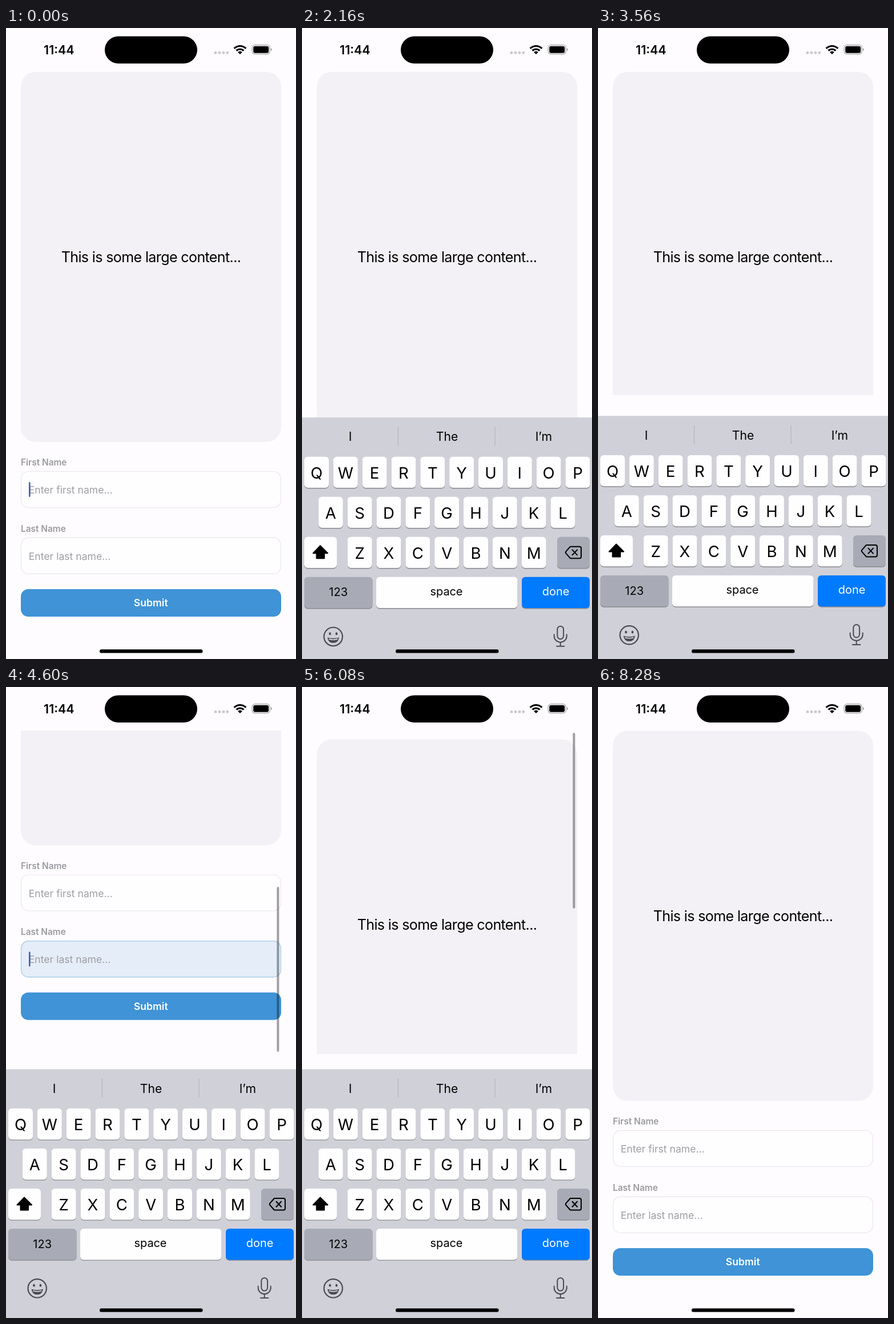
An HTML page for the animation above (8.32 s loop, 508 px wide and 1102 px high).

```html
<!DOCTYPE html>
<html lang="en">
<head>
<meta charset="utf-8">
<title>Form with keyboard</title>
<style>
  html, body { margin: 0; width: 100%; height: 100%; overflow: hidden; background: #fefcff; }
  svg { display: block; width: 508px; height: 1102px; }
  text { font-family: Inter, Roboto, sans-serif; font-optical-sizing: none; }
</style>
</head>
<body>
<svg id="stage" viewBox="0 0 508 1102" xmlns="http://www.w3.org/2000/svg"></svg>
<script>
const LOOP = 8320;
const VIEW_TOP = 76, VIEW_BOTTOM = 641;
const MAX_SCROLL = 412.5;
const KEYBOARD_H = 434.5;

// ---------- drawing helpers ----------
const rect = (x, y, w, h, r, fill, extra = '') =>
  `<rect x="${x}" y="${y}" width="${w}" height="${h}" rx="${r}" fill="${fill}" ${extra}/>`;

const text = (x, y, size, str, { fill = '#000', weight = 400, anchor = 'middle', track = 0 } = {}) =>
  `<text x="${x}" y="${y}" font-size="${size}" font-weight="${weight}" fill="${fill}" ` +
  `text-anchor="${anchor}" letter-spacing="${track}em">${str}</text>`;

const line = (d, width, color, extra = '') =>
  `<path d="${d}" fill="none" stroke="${color}" stroke-width="${width}" ` +
  `stroke-linecap="round" stroke-linejoin="round" ${extra}/>`;

function field(id, y, label, hint) {
  const box = (fill, stroke, extra) =>
    rect(26.5, y + .5, 455, 63, 13, fill, `stroke="${stroke}" stroke-width="1.2" ${extra}`);
  return text(26, y - 9.8, 15.4, label, { fill: '#9b9a9f', weight: 600, anchor: 'start' }) +
    box('#fefdff', '#e9e7ec', '') +
    box('#e4edf8', '#a5cbeb', `id="${id}Glow" opacity="0"`) +
    text(39.8, y + 39, 17.6, hint, { fill: '#9f9ea3', anchor: 'start' }) +
    rect(40, y + 19, 2.6, 26, 1.3, '#4560b0', `id="${id}Caret" opacity="0"`);
}

function form() {
  return rect(26, 76.5, 456, 646.5, 26, '#f3f1f5') +
    text(254, 409, 25.1, 'This is some large content...', { track: -.026 }) +
    field('first', 774, 'First Name', 'Enter first name...') +
    field('last', 889.7, 'Last Name', 'Enter last name...') +
    rect(26, 980, 456, 48, 13, '#3f93d6') +
    text(253.7, 1010.3, 17.6, 'Submit', { fill: '#fff', weight: 600 });
}

const key = (x, y, w, fill = '#fefdff') =>
  rect(x, y + 1.4, w, 54.4, 6, '#898a8e') + rect(x, y, w, 54.4, 6, fill);

const keyRow = (letters, x, y) => [...letters].map((c, i) => {
  const left = x + i * 50.83;
  return key(left, y, 43) + text(left + 21.5, y + 38, 27.6, c);
}).join('');

function keyboard() {
  const ink = '#4b4c51', grey = '#a8abb5';
  const words = ['I', 'The', 'I’m'].map((w, i) => text(84.7 + i * 169.3, 708.6, 21.2, w)).join('');
  const dividers = [168.5, 338].map(x => rect(x - .6, 684, 1.2, 33, 0, '#b5b6bd')).join('');
  const shift = `<path d="M32 891.5L45 904.5H39V913.5H25.500V904.500H19.500Z" stroke="#000" ` +
    `stroke-width="2" stroke-linejoin="round"/>`;
  const erase = line('M470 893H486Q489 893 489 896V910.500Q489 913.500 486 913.500H470' +
      'L462.500 905Q461 903.200 462.500 901.500Z', 2, '#000') +
    line('M473.500 898.700L482 907.700M482 898.700L473.500 907.700', 2, '#000');
  const smiley = `<circle cx="54.700" cy="1050.300" r="16.200" fill="none" stroke="${ink}" stroke-width="2.200"/>` +
    [49, 60.4].map(x => `<ellipse cx="${x}" cy="1045" rx="1.900" ry="2.500" fill="${ink}"/>`).join('') +
    `<path d="M44.500 1051.500Q54.700 1054.500 65 1051.500Q63.500 1061.300 54.700 1061.300Q46 1061.300 44.500 1051.500Z" fill="${ink}"/>` +
    line('M47.800 1054.600Q54.700 1056.800 61.700 1054.600', 1.9, '#d0d1d8');
  const mic = rect(447.3, 1032, 10.8, 22.5, 5.4, 'none', `stroke="${ink}" stroke-width="2"`) +
    line('M441.700 1046.500V1049.500A11 10.500 0 0 0 463.700 1049.500V1046.500M452.700 1060V1067M446 1067H459.400', 2, ink);
  return rect(0, 667.5, 508, 436, 0, '#d0d1d8') + words + dividers +
    keyRow('QWERTYUIOP', 4, 736) +
    keyRow('ASDFGHJKL', 28.8, 806) +
    keyRow('ZXCVBNM', 79.7, 876) +
    key(4, 876, 57) + shift + key(447, 876, 57, grey) + erase +
    key(4, 946, 119.5, grey) + text(63.7, 979.6, 20, '123') +
    key(130, 946, 247.5) + text(253, 978.3, 20, 'space', { track: -.005 }) +
    key(385, 946, 119, '#007aff') + text(444.5, 978.3, 20, 'done', { fill: '#fff' }) +
    smiley + mic;
}

function statusBar() {
  const arc = r => {
    const d = r * Math.SQRT1_2;
    return `M${410 - d} ${46 - d}A${r} ${r} 0 0 1 ${410 + d} ${46 - d}`;
  };
  return text(92.8, 46, 21.4, '11:44', { weight: 600 }) +
    rect(173, 14.5, 162, 47.5, 23.75, '#000') +
    [367, 374, 381, 387.7].map(x => rect(x - 2.2, 41, 4.4, 4.6, 1.2, '#c9c8cc')).join('') +
    `<path d="${arc(14.5)}${arc(9)}" fill="none" stroke="#000" stroke-width="3.200"/>` +
    `<path d="${arc(5.4)}L410 46Z"/>` +
    rect(431.2, 29.7, 31, 16, 5, 'none', 'stroke="#a3a2a5" stroke-width="1.300"') +
    rect(433.2, 31.7, 27, 12, 3.2, '#000') +
    `<path d="M464 35V40.500Q466 39.500 466 37.700T464 35Z" fill="#a3a2a5"/>`;
}

const $ = id => document.getElementById(id);
$('stage').innerHTML =
  `<defs><clipPath id="view"><rect id="viewRect" x="0" y="${VIEW_TOP}" width="508" height="1026"/></clipPath></defs>` +
  rect(0, 0, 508, 1102, 0, '#fefcff') +
  `<g clip-path="url(#view)"><g id="form">${form()}</g></g>` +
  rect(474.4, 80, 4, 300, 2, '#000', 'id="bar"') +
  `<g id="keyboard">${keyboard()}</g>` +
  statusBar() + rect(164, 1085.3, 180.6, 6.3, 3.15, '#000');

// ---------- motion ----------
const clamp = v => Math.max(0, Math.min(1, v));
const ramp = (t, start, length) => clamp((t - start) / length);

// Critically damped spring from 0 to 1
const spring = ms => {
  if (ms <= 0) return 0;
  const x = ms * .0173;
  return 1 - (1 + x) * Math.exp(-x);
};

const sessions = [
  { id: 'first', focus: 0, show: 20, hide: 2145.8 },
  { id: 'last', focus: 3190, show: 3233, hide: 7660 }
];

// Two drags to the end and one back, each with a rubber-band bounce
const drags = [
  [3900, 0], [4050, 60], [4250, 230], [4400, 380], [4520, 438], [4600, 446.5],
  [4700, 435], [4850, 418], [5050, MAX_SCROLL],
  [5400, MAX_SCROLL], [5550, 330], [5700, 160], [5850, 35], [5960, -18], [6010, -22],
  [6080, -15.2], [6200, -4], [6350, 0],
  [6420, 0], [6520, 70], [6640, 230], [6760, 395], [6840, 439],
  [6960, 426], [7100, 415.5], [7300, MAX_SCROLL]
];

// Monotone cubic through the points
function curve(points, t) {
  const last = points.length - 1;
  if (t <= points[0][0]) return points[0][1];
  if (t >= points[last][0]) return points[last][1];
  const i = points.findIndex(p => p[0] > t) - 1;
  const slope = k => (points[k + 1][1] - points[k][1]) / (points[k + 1][0] - points[k][0]);
  const tangent = k => {
    if (k === 0 || k === last) return 0;
    const a = slope(k - 1), b = slope(k);
    return a * b <= 0 ? 0 : 2 * a * b / (a + b);
  };
  const [t0, y0] = points[i], [t1, y1] = points[i + 1];
  const h = t1 - t0, u = (t - t0) / h, v = 1 - u;
  return y0 * (1 + 2 * u) * v * v + h * tangent(i) * u * v * v +
    y1 * u * u * (3 - 2 * u) - h * tangent(i + 1) * u * u * v;
}

function blink(ms) {
  const p = ms % 1000;
  return p < 500 ? 1 : Math.max(1 - ramp(p, 500, 120), ramp(p, 900, 100));
}

function drawBar(t, scroll) {
  const track = 557, full = track * 565 / (565 + MAX_SCROLL);
  const over = Math.max(0, -scroll, scroll - MAX_SCROLL);
  const length = full - over;
  const y = 80 + clamp(scroll / MAX_SCROLL) * (track - length);
  $('bar').setAttribute('y', y);
  $('bar').setAttribute('height', length);
  $('bar').setAttribute('opacity', .37 * ramp(t, 3900, 80) * (1 - ramp(t, 7380, 250)));
}

function render(t) {
  let raised = 0, open = false;
  for (const s of sessions) {
    raised += spring(t - s.show) - spring(t - s.hide);
    if (t >= s.show && t < s.hide) open = true;
    const focused = t >= s.focus && t < s.hide;
    $(s.id + 'Caret').setAttribute('opacity', focused ? blink(t - s.focus) : 0);
    $(s.id + 'Glow').setAttribute('opacity', ramp(t, s.focus + 10, 250) - ramp(t, s.hide, 250));
  }
  const scroll = open ? curve(drags, t) : 0;
  $('viewRect').setAttribute('height', (open ? VIEW_BOTTOM : 1102) - VIEW_TOP);
  $('form').setAttribute('transform', `translate(0 ${-scroll})`);
  $('keyboard').setAttribute('transform', `translate(0 ${KEYBOARD_H * (1 - raised)})`);
  drawBar(t, scroll);
}

const start = performance.now();
function tick(now) {
  render(Math.max(0, now - start) % LOOP);
  requestAnimationFrame(tick);
}
render(0);
requestAnimationFrame(tick);
</script>
</body>
</html>
```
